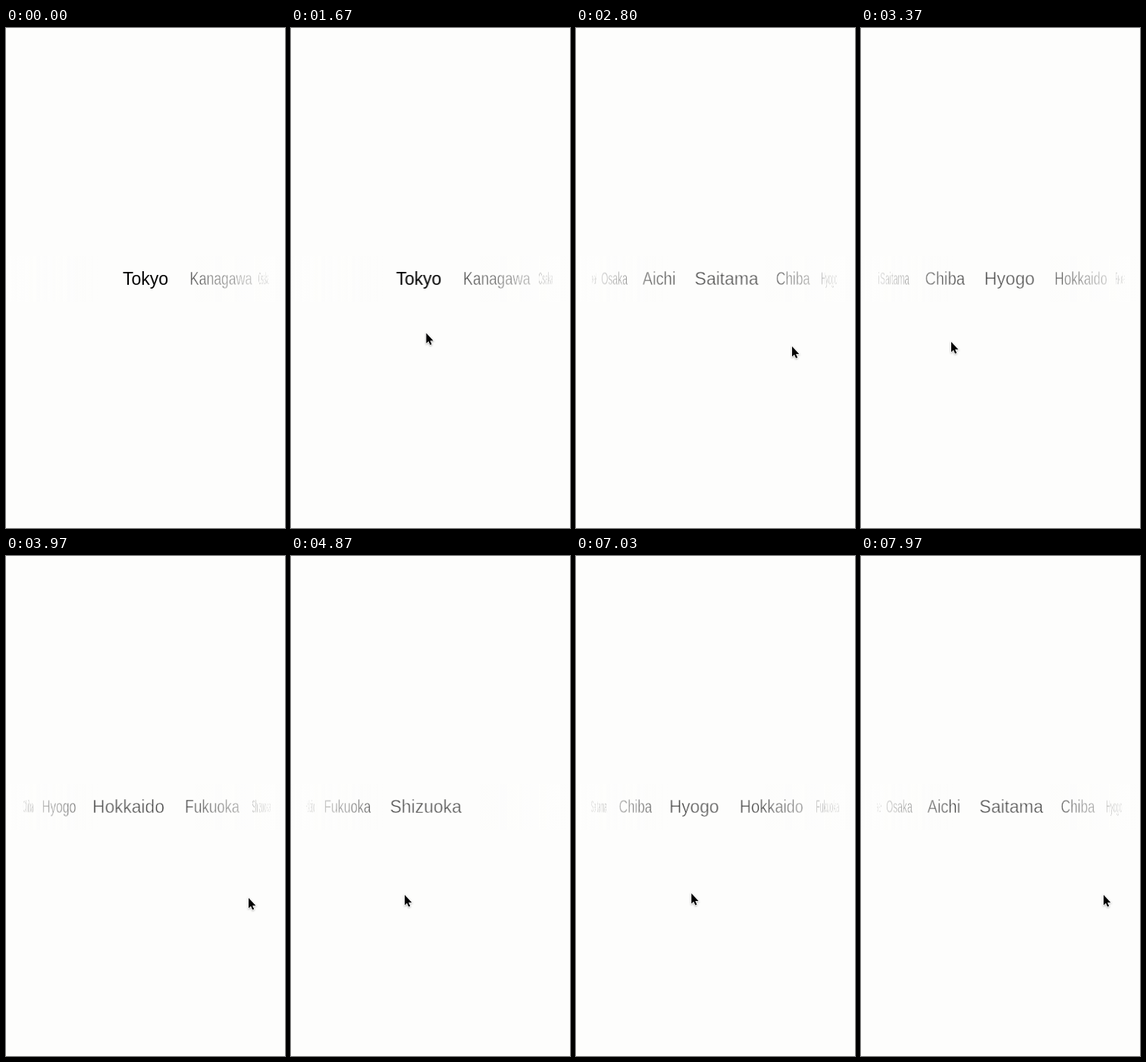
An HTML page for the animation above (8000 ms loop, 368 px wide and 658 px high).

```html
<!DOCTYPE html>
<html lang="en">
<head>
<meta charset="utf-8">
<title>Prefecture wheel</title>
<style>
  :root { --paper: #fdfdfc; }
  html, body { margin: 0; width: 100%; height: 100%; overflow: hidden; background: var(--paper); }
  #stage { position: relative; width: 368px; height: 658px; overflow: hidden; background: var(--paper); }
  #wheel { position: absolute; left: 0; top: 307px; width: 368px; height: 46px; perspective: 1150px; }
  .item { position: absolute; left: 114px; top: 0; width: 140px; height: 46px; }
  .item span {
    position: absolute; inset: 0; text-align: center; white-space: nowrap;
    font: 23px/46px "Liberation Sans", Arial, sans-serif;
  }
  .light { color: #444; -webkit-text-stroke: .55px var(--paper); }
  .strong { color: #000; }
  #fade {
    position: absolute; left: 0; top: 300px; width: 368px; height: 60px; z-index: 1;
    background: linear-gradient(90deg, var(--paper), #fdfdfc00 33%, #fdfdfc00 66%, var(--paper));
  }
  #cursor {
    position: absolute; left: 0; top: 0; width: 16px; height: 24px; z-index: 2; overflow: visible;
    filter: drop-shadow(0 1px 1px rgba(0, 0, 0, .3));
  }
</style>
</head>
<body>
<div id="stage">
  <div id="wheel"></div>
  <div id="fade"></div>
  <svg id="cursor"><path d="M0 1V14.5L3 11.7 5.1 16.6 7.2 15.7 5.1 10.9H9.3Z" fill="#000" stroke="#fff" stroke-width="1.4" paint-order="stroke"/></svg>
</div>
<script>
const LOOP = 8000, SCALE = 1.15, RADIUS = 184, GAP = 21.5, GLIDE = 525;
const names = "Tokyo Kanagawa Osaka Aichi Saitama Chiba Hyogo Hokkaido Fukuoka Shizuoka".split(" ");

// Pointer moves; those with a coast drag the wheel, which then glides on by that distance
const origin = { x: 372, y: 332 };
const moves = [
  { at: 1000, ms: 300, x: 194, y: 400 },
  { at: 1630, ms: 200, x: 64, y: 404, coast: 262 },
  { at: 1830, ms: 400, x: 285, y: 418 },
  { at: 3150, ms: 220, x: 119, y: 412, coast: 180 },
  { at: 3370, ms: 500, x: 320, y: 449 },
  { at: 4640, ms: 230, x: 150, y: 445, coast: -4.4 },
  { at: 4870, ms: 600, x: -20, y: 487 },
  { at: 5870, ms: 200, x: 64, y: 445 },
  { at: 6430, ms: 210, x: 284, y: 444, coast: -155 },
  { at: 6640, ms: 400, x: 152, y: 443 },
  { at: 7700, ms: 270, x: 320, y: 445, coast: 0 }
];

const clamp = v => Math.min(1, Math.max(0, v));
const smooth = u => u * u * (3 - 2 * u);
const accelerate = u => u * (1 + u) / 2;

function stateAt(t) {
  let { x, y } = origin;
  let offset = 0, coast = 0, released = 0;
  const glide = time => coast * (1 - Math.exp(-Math.max(0, time - released) / GLIDE));
  for (const move of moves) {
    if (t < move.at) break;
    const drags = "coast" in move;
    const u = clamp((t - move.at) / move.ms);
    const eased = drags ? accelerate(u) : smooth(u);
    const dx = (move.x - x) * eased;
    if (drags) {
      offset += glide(move.at) - dx / SCALE;
      coast = move.coast;
      released = move.at + move.ms;
    }
    x += dx;
    y += (move.y - y) * eased;
  }
  return { x, y, offset: offset + glide(t) };
}

const wheel = document.getElementById("wheel");
const cursor = document.getElementById("cursor");
const ruler = document.createElement("canvas").getContext("2d");
ruler.font = '20px "Liberation Sans", Arial, sans-serif';

function addSpan(parent, className, text) {
  const span = document.createElement("span");
  span.className = className;
  span.textContent = text;
  parent.append(span);
  return span;
}

let edge = 0;
const items = names.map(name => {
  const box = document.createElement("div");
  box.className = "item";
  const light = addSpan(box, "light", name);
  const strong = addSpan(box, "strong", name);
  wheel.append(box);
  const width = Math.ceil(ruler.measureText(name).width);
  const center = edge + width / 2;
  edge += width + GAP;
  return { box, light, strong, center };
});

function render(t) {
  const { x, y, offset } = stateAt(t);
  const settle = clamp((t - 5870) / 200);
  items.forEach(({ box, light, strong, center }, i) => {
    const angle = (center - items[0].center - offset) * SCALE / RADIUS;
    const selected = i === 0 ? 1 - settle : i === items.length - 1 ? settle : 0;
    box.style.visibility = Math.abs(angle) < Math.PI / 2 ? "visible" : "hidden";
    box.style.transform = `translateZ(${-RADIUS}px) rotateY(${angle}rad) translateZ(${RADIUS}px)`;
    light.style.opacity = 1 - selected;
    strong.style.opacity = selected;
  });
  cursor.style.transform = `translate(${x}px, ${y}px)`;
}

let start;
function tick(now) {
  start ??= now;
  render((now - start) % LOOP);
  requestAnimationFrame(tick);
}
render(0);
requestAnimationFrame(tick);
</script>
</body>
</html>
```
